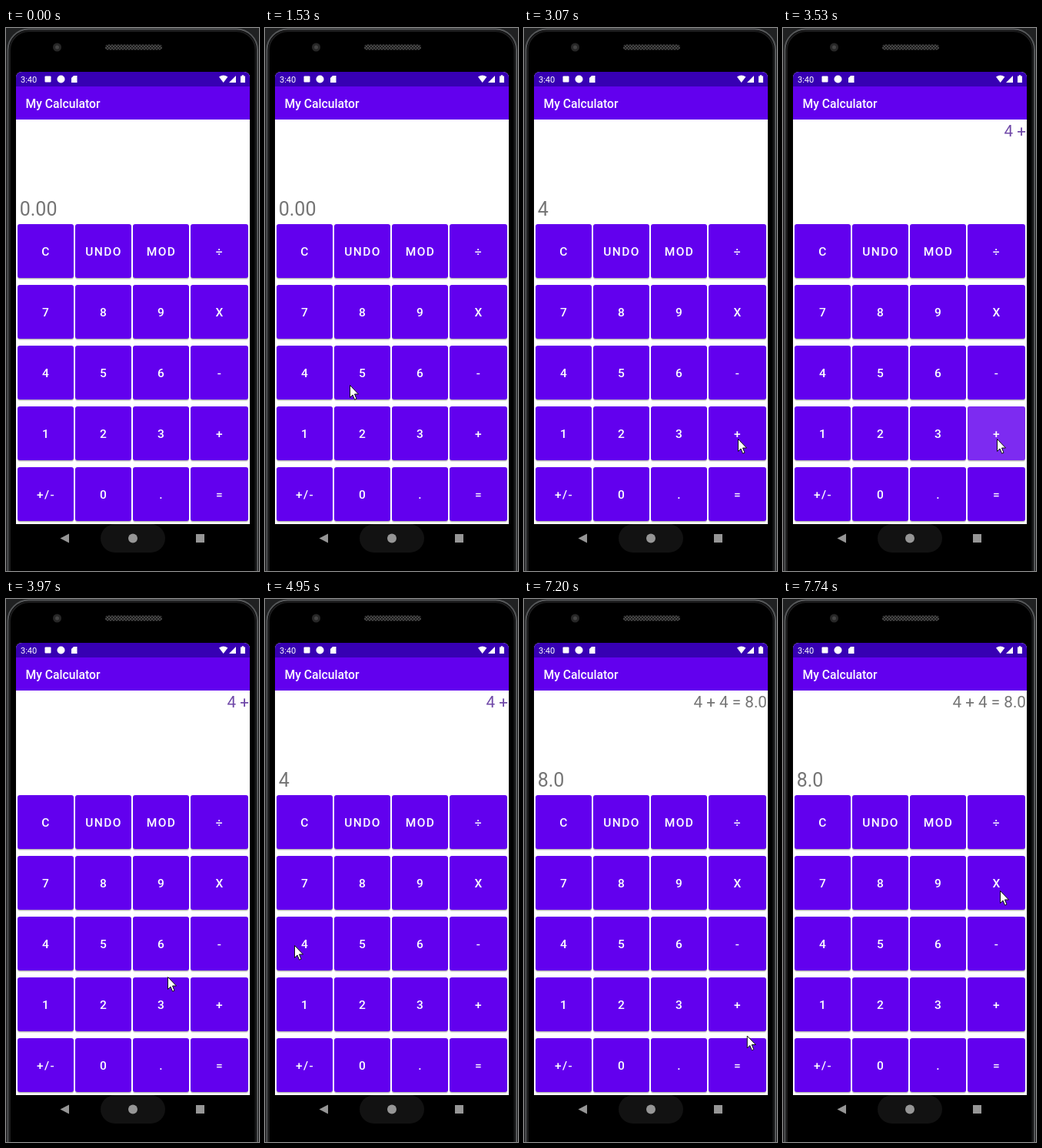
An HTML page that plays this animation: 329 by 706 pixels, repeating every 8000 ms.

```html
<!DOCTYPE html>
<html lang="en">
<head>
<meta charset="utf-8">
<title>Calculator</title>
<style>
  html, body { margin: 0; width: 100%; height: 100%; overflow: hidden; background: #202122; }
  svg { display: block; width: 329px; height: 706px; font-family: Roboto, sans-serif; }
  .label { font-size: 15.5px; font-weight: 500; letter-spacing: 1.4px; text-anchor: middle; fill: #fff; }
  .display { fill: #757575; white-space: pre; }
</style>
</head>
<body>
<svg viewBox="0 0 329 706">
  <defs>
    <pattern id="mesh" width="4" height="4" patternUnits="userSpaceOnUse">
      <rect width="4" height="4" fill="#1b1b1b"/>
      <path d="M0 0L4 4M4 0L0 4" stroke="#555" stroke-width=".8"/>
    </pattern>
    <clipPath id="screen"><path d="M13 645V65q0-8 8-8H309q8 0 8 8V645Z"/></clipPath>
  </defs>

  <!-- phone body -->
  <rect x="2.5" y="1.5" width="324.5" height="760" rx="27" fill="#000" stroke="#56585a" stroke-width="2"/>
  <rect x="5" y="4" width="319.5" height="760" rx="25" fill="none" stroke="#1c1c1d" stroke-width="2"/>
  <circle cx="66.500" cy="25" r="5.5" fill="#272727"/>
  <circle cx="66.500" cy="25" r="2.5" fill="#444"/>
  <rect x="129" y="21.500" width="74" height="7" rx="3.5" fill="url(#mesh)"/>

  <g clip-path="url(#screen)">
    <rect x="13" y="57" width="304" height="588" fill="#fff"/>
    <rect x="13" y="57" width="304" height="19" fill="#3700b3"/>
    <rect x="13" y="76" width="304" height="43" fill="#6200ee"/>
  </g>

  <!-- status bar -->
  <g fill="#fff">
    <text x="19" y="70.500" font-size="11">3:40</text>
    <rect x="50.500" y="62.500" width="8" height="8" rx="1"/>
    <circle cx="71.500" cy="66.500" r="5"/>
    <path d="M88 62h4.500v9h-7.500v-6Z"/>
    <path d="M277 63.500q5.700-4 11.400 0L282.700 71Z"/>
    <path d="M299 62v9h-9Z"/>
    <path d="M305 62.500h1.800v-1.200h2.400v1.200h1.800V71h-6Z"/>
  </g>
  <text x="25.500" y="103.500" font-size="15.700" font-weight="500" fill="#fff">My Calculator</text>

  <text id="history" class="display" x="316" y="141" font-size="20.700" text-anchor="end"></text>
  <text id="entry" class="display" x="17.700" y="244" font-size="25"></text>
  <g id="keys"></g>

  <!-- navigation bar -->
  <rect x="123" y="645" width="84" height="37" rx="18.500" fill="#121212"/>
  <g fill="#969696">
    <path d="M70.500 663.500L82 657.500v12Z"/>
    <circle cx="165" cy="663.500" r="6"/>
    <rect x="247" y="658" width="11" height="11"/>
  </g>

  <path id="cursor" d="M.5 .5V16.500L4 13 6.600 19.200 9 18.200 6.500 12H11.500Z" fill="#fff" stroke="#111" stroke-width="1"/>
</svg>

<script>
const LOOP = 8000, TICK = 90;
const NS = "http://www.w3.org/2000/svg";
const byId = id => document.getElementById(id);

function add(parent, tag, attributes, text = "") {
  const node = document.createElementNS(NS, tag);
  for (const name in attributes) node.setAttribute(name, attributes[name]);
  node.textContent = text;
  parent.append(node);
  return node;
}

const rows = ["C UNDO MOD ÷", "7 8 9 X", "4 5 6 -", "1 2 3 +", "+/- 0 . ="];
const ripples = {};
rows.forEach((row, r) => row.split(" ").forEach((label, c) => {
  const x = 15 + 75 * c, y = 255 + 79 * r, width = c === 3 ? 75 : 73, keys = byId("keys");
  const box = { x, y, width, height: 70, rx: 3 };
  add(keys, "rect", { ...box, y: y + 2, fill: "#000", opacity: .12 });
  add(keys, "rect", { ...box, y: y + 1, fill: "#000", opacity: .18 });
  add(keys, "rect", { ...box, fill: "#6200ee" });
  const clip = add(keys, "clipPath", { id: `key${r}${c}` });
  add(clip, "rect", box);
  const circle = add(keys, "circle", { "clip-path": `url(#key${r}${c})`, fill: "#fff", opacity: 0 });
  ripples[label] = { circle, x: x + width / 2, y: y + 35 };
  add(keys, "text", { class: "label", x: x + width / 2 + .5, y: y + 41 }, label);
}));

// Times below are in ticks.
const path = [
  [11, 258, 688], [17, 110, 464], [18, 98, 444], [19, 88, 448], [22, 64, 433],
  [29, 64, 433], [34, 278, 534], [42, 278, 534], [44, 210, 491], [48, 38, 450],
  [55, 38, 450], [61, 303, 597], [63, 295, 600], [79, 295, 600], [83, 274, 470], [86, 282, 379]
];
const presses = [
  { at: 27, key: "4", entry: "4", history: "" },
  { at: 36, key: "+", entry: "", history: "4 +", tint: "#7049a8" },
  { at: 49, key: "4", entry: "4", history: "4 +", tint: "#7049a8" },
  { at: 66, key: "=", entry: "8.0", history: "4 + 4 = 8.0" }
];
const rippleAlpha = [.2, .25, .25, .17, .08];
const mix = (a, b, p) => a + (b - a) * p;

function cursorAt(tick) {
  const next = path.findIndex(point => point[0] > tick);
  if (next < 0) return path.at(-1).slice(1);
  if (next === 0) return path[0].slice(1);
  const [t0, x0, y0] = path[next - 1], [t1, x1, y1] = path[next];
  const p = (tick - t0) / (t1 - t0);
  return [mix(x0, x1, p), mix(y0, y1, p)];
}

function draw(time) {
  const tick = Math.floor((time % LOOP + 10) / TICK);
  const [x, y] = cursorAt(tick);
  byId("cursor").setAttribute("transform", `translate(${x} ${y})`);
  byId("cursor").setAttribute("visibility", tick < 11 ? "hidden" : "visible");

  const state = presses.findLast(press => tick > press.at) || { entry: "0.00", history: "" };
  byId("entry").textContent = state.entry;
  byId("history").textContent = state.history;
  byId("history").style.fill = state.tint || "#757575";

  for (const key in ripples) ripples[key].circle.setAttribute("opacity", 0);
  for (const { at, key } of presses) {
    const age = tick - at;
    if (!(age in rippleAlpha)) continue;
    const target = ripples[key], [px, py] = cursorAt(at), p = age / 4;
    const values = { cx: mix(px, target.x, p), cy: mix(py, target.y, p), r: 18 + 11 * age, opacity: rippleAlpha[age] };
    for (const name in values) target.circle.setAttribute(name, values[name]);
  }
}

const start = performance.now();
function frame() {
  draw(performance.now() - start);
  requestAnimationFrame(frame);
}
frame();
</script>
</body>
</html>
```
